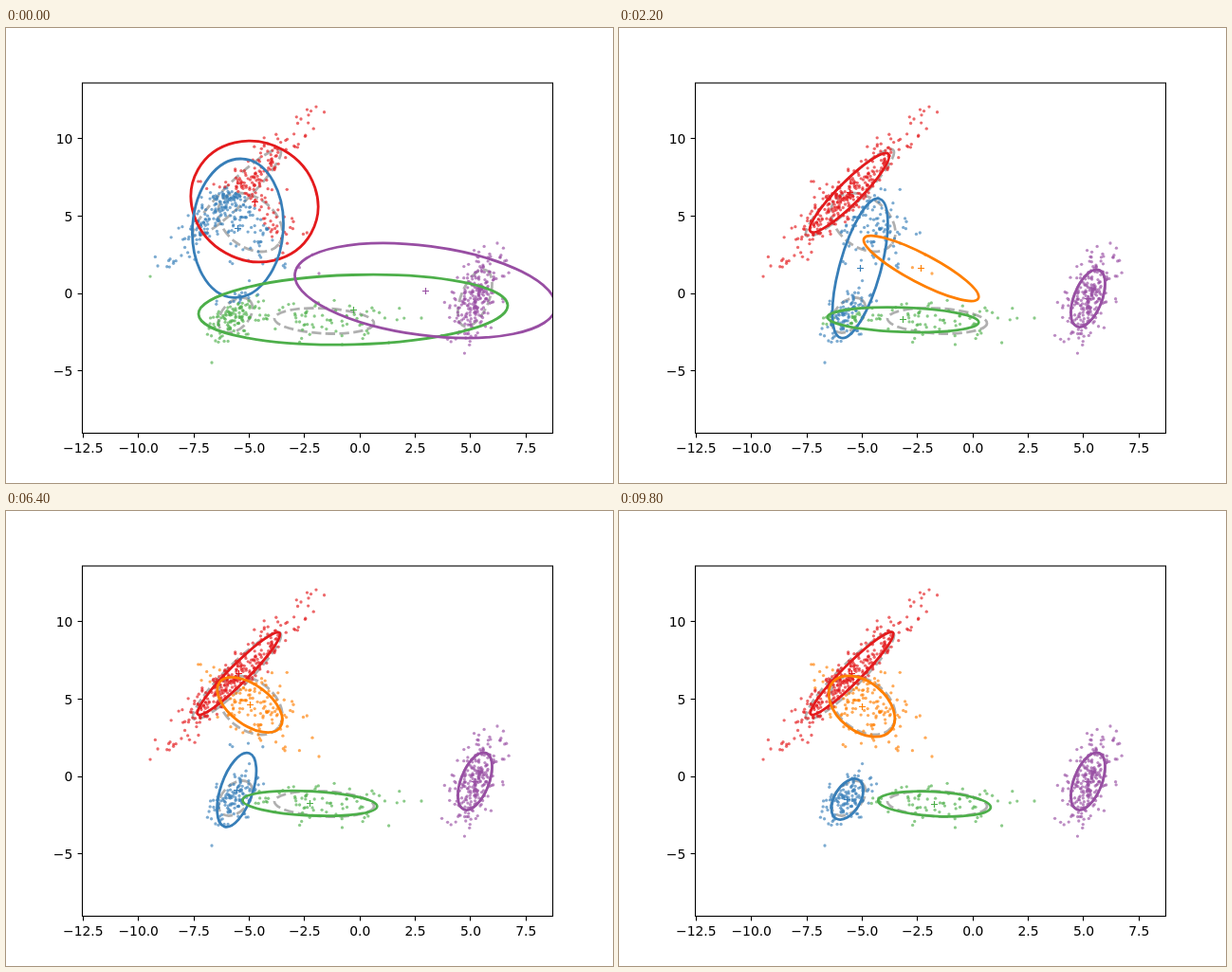
Animation, 640 px wide and 480 px high, one loop 10 s. Source, as an HTML page:

```html
<!DOCTYPE html>
<html lang="en">
<head>
<meta charset="utf-8">
<title>Mixture fit</title>
<style>
  html, body { margin: 0; width: 100%; height: 100%; overflow: hidden; background: #fff; }
  svg { display: block; width: 640px; height: 480px; }
  text { font: 13.89px "DejaVu Sans", sans-serif; fill: #000; }
</style>
</head>
<body>
<svg id="stage" viewBox="0 0 640 480">
  <defs><clipPath id="plot"><rect x="80" y="58" width="496.5" height="369.5"/></clipPath></defs>
  <g clip-path="url(#plot)">
    <g id="truth" fill="none" stroke="#b0b0b0" stroke-width="2.78" stroke-dasharray="10.3 4.4"></g>
    <g id="dots" fill-opacity=".65"></g>
    <g id="fits" fill="none"></g>
  </g>
  <g id="axes" fill="none" stroke="#000" stroke-width="1.1"></g>
  <g id="labels"></g>
</svg>
<script>
const STEP = 200, STEPS = 50;
const COLORS = ['#e41a1c', '#377eb8', '#4daf4a', '#984ea3', '#ff7f00'];
const ORANGE = 4, ORANGE_START = 2;

// Gaussians are [cx, cy, half width, half height, correlation] of the drawn ellipse,
// whose half extents are sqrt(2) standard deviations.
const TRUTH = [
  [243.5, 174, 46.5, 46, -.93],
  [242, 303, 18, 18.5, -.4],
  [335.5, 309, 52.5, 13.5, .18],
  [494.5, 285, 18, 30, -.5],
  [257.5, 205, 34, 31, .35]
];
const COUNTS = [275, 130, 72, 240, 148];
const OUTLIERS = [[330, 259], [160, 251], [311, 96], [438, 306], [217, 353], [518, 227]];

// Fitted components: [step, ...gaussian]
const KEYS = [
  [[0, 262, 183, 67, 63.8, .08], [3, 249, 173.8, 42.3, 44.3, -.79], [11, 243, 173.8, 41.8, 41.8, -.92],
   [37, 245.6, 171.3, 43.7, 43.7, -.95]],
  [[0, 244.5, 211.2, 48, 73.2, -.06], [3, 246.6, 225.3, 34.4, 78, -.17], [11, 254.2, 253.5, 29.2, 73.5, -.64],
   [27, 247, 279.5, 25.5, 60, -.6], [37, 240.8, 304, 16.8, 21.5, -.45]],
  [[0, 366, 297.2, 163, 37, -.12], [3, 347.8, 303.8, 148, 20.3, -.46], [11, 299.6, 307.8, 79.7, 13.2, .2],
   [27, 309.4, 307.8, 78, 13.2, .22], [37, 330, 309, 63, 13.4, .27], [49, 332.6, 309, 59.3, 13.4, .26]],
  [[0, 442, 277, 137.5, 50, .32], [3, 495, 284.2, 20, 30.4, -.52], [11, 494.5, 285.2, 18, 30.3, -.5]],
  [[3, 466.4, 283.3, 96.5, 38.6, .19], [11, 318.6, 253.6, 60.6, 34.4, .87], [19, 273.5, 211.4, 29.3, 22.6, .87],
   [27, 259.7, 203, 33.2, 25, .75], [37, 256, 206, 34.8, 32.2, .4]]
];

const el = (id) => document.getElementById(id);
function add(parent, tag, attrs, text) {
  const node = document.createElementNS('http://www.w3.org/2000/svg', tag);
  for (const k in attrs) node.setAttribute(k, attrs[k]);
  if (text) node.textContent = text;
  return parent.appendChild(node);
}

function randomizer(seed) {
  return () => {
    seed = (seed * 48271) % 2147483647;
    return seed / 2147483647;
  };
}

// Monotone cubic interpolation through the keys of one component
function fitAt(keys, s) {
  const last = keys.length - 1;
  if (s <= keys[0][0]) return keys[0].slice(1);
  if (s >= keys[last][0]) return keys[last].slice(1);
  const i = keys.findIndex(k => k[0] > s) - 1;
  const a = keys[i], b = keys[i + 1], h = b[0] - a[0], u = (s - a[0]) / h;
  const slope = (j, d) => (keys[j + 1][d] - keys[j][d]) / (keys[j + 1][0] - keys[j][0]);
  const tangent = (j, d) => {
    if (j === 0) return slope(0, d);
    if (j === last) return 0;
    const p = slope(j - 1, d), q = slope(j, d);
    return p * q <= 0 ? 0 : 2 * p * q / (p + q);
  };
  return a.map((v, d) =>
    v * (1 + 2 * u) * (1 - u) ** 2 + b[d] * u * u * (3 - 2 * u) +
    h * u * (1 - u) * (tangent(i, d) * (1 - u) - tangent(i + 1, d) * u)).slice(1);
}

function density([cx, cy, w, h, r], [x, y]) {
  const dx = (x - cx) / w, dy = (y - cy) / h, k = 1 - r * r;
  return Math.exp(-(dx * dx + dy * dy - 2 * r * dx * dy) / k) / (w * h * Math.sqrt(k));
}

// Half axes, center and angle of the ellipse
function ellipseAttrs([cx, cy, w, h, r]) {
  const a = w * w, b = h * h, c = r * w * h;
  const mid = (a + b) / 2, dev = Math.hypot((a - b) / 2, c);
  const angle = Math.atan2(2 * c, a - b) * 90 / Math.PI;
  return { rx: Math.sqrt(mid + dev), ry: Math.sqrt(mid - dev),
           transform: `translate(${cx} ${cy}) rotate(${angle})` };
}

function makePoints() {
  const rand = randomizer(1234), points = [...OUTLIERS];
  TRUTH.forEach(([cx, cy, w, h, r], k) => {
    for (let i = 0; i < COUNTS[k]; i++) {
      const m = Math.min(2.8, Math.sqrt(-2 * Math.log(1 - rand()))) / Math.SQRT2;
      const t = rand() * 2 * Math.PI, p = m * Math.cos(t), q = m * Math.sin(t);
      points.push([cx + w * p, cy + h * (r * p + Math.sqrt(1 - r * r) * q)]);
    }
  });
  return points;
}

// Every step: fitted components and the most likely one for each point
function makeSteps(points) {
  let weights = [.25, .25, .25, .25, 0];
  return Array.from({ length: STEPS }, (_, s) => {
    const fits = KEYS.map(keys => fitAt(keys, s));
    if (s >= ORANGE_START) weights[ORANGE] = Math.max(weights[ORANGE], .004);
    const sums = COLORS.map(() => 0);
    const owners = points.map(p => {
      const d = fits.map((g, k) => weights[k] * density(g, p));
      const total = d.reduce((a, b) => a + b, 0) || 1;
      d.forEach((v, k) => { sums[k] += v / total; });
      return d.indexOf(Math.max(...d));
    });
    weights = sums.map(v => v / points.length);
    return { fits, owners };
  });
}

function drawAxes() {
  const axes = el('axes'), labels = el('labels');
  add(axes, 'rect', { x: 80.5, y: 58, width: 496, height: 369.5 });
  const num = (v, digits) => (v < 0 ? '\u2212' : '') + Math.abs(v).toFixed(digits);
  for (let v = -12.5; v <= 7.5; v += 2.5) {
    const x = 373.2 + v * 23.35;
    add(axes, 'path', { d: `M${Math.floor(x) + .5} 427.5v4.9` });
    add(labels, 'text', { x, y: 447.6, 'text-anchor': 'middle' }, num(v, 1));
  }
  for (let v = -5; v <= 10; v += 5) {
    const y = 280 - v * 16.33;
    add(axes, 'path', { d: `M80.5 ${Math.floor(y) + .5}h-4.9` });
    add(labels, 'text', { x: 70.3, y: y + 5.2, 'text-anchor': 'end' }, num(v, 0));
  }
}

drawAxes();
TRUTH.forEach(g => add(el('truth'), 'ellipse', ellipseAttrs(g)));
const points = makePoints(), steps = makeSteps(points);
const dots = points.map(([cx, cy]) => add(el('dots'), 'circle', { cx, cy, r: 1.65 }));
const shapes = COLORS.map(stroke => {
  const group = add(el('fits'), 'g', { stroke });
  return { group,
    ring: add(group, 'ellipse', { 'stroke-width': 2.78 }),
    mark: add(group, 'path', { d: 'M-3.5 0h7M0-3.5v7', 'stroke-width': 1.2 }) };
});

let shown = -1;
function render(ms) {
  const s = Math.floor(ms / STEP) % STEPS;
  if (s === shown) return;
  shown = s;
  const { fits, owners } = steps[s];
  dots.forEach((dot, i) => dot.setAttribute('fill', COLORS[owners[i]]));
  shapes.forEach(({ group, ring, mark }, k) => {
    const attrs = ellipseAttrs(fits[k]);
    for (const name in attrs) ring.setAttribute(name, attrs[name]);
    const [x, y] = fits[k].map(v => Math.floor(v) + .5);
    mark.setAttribute('transform', `translate(${x} ${y})`);
    group.setAttribute('visibility', k === ORANGE && s < ORANGE_START ? 'hidden' : 'visible');
  });
}

const start = performance.now();
function tick() {
  render(performance.now() - start);
  requestAnimationFrame(tick);
}
tick();
</script>
</body>
</html>
```
